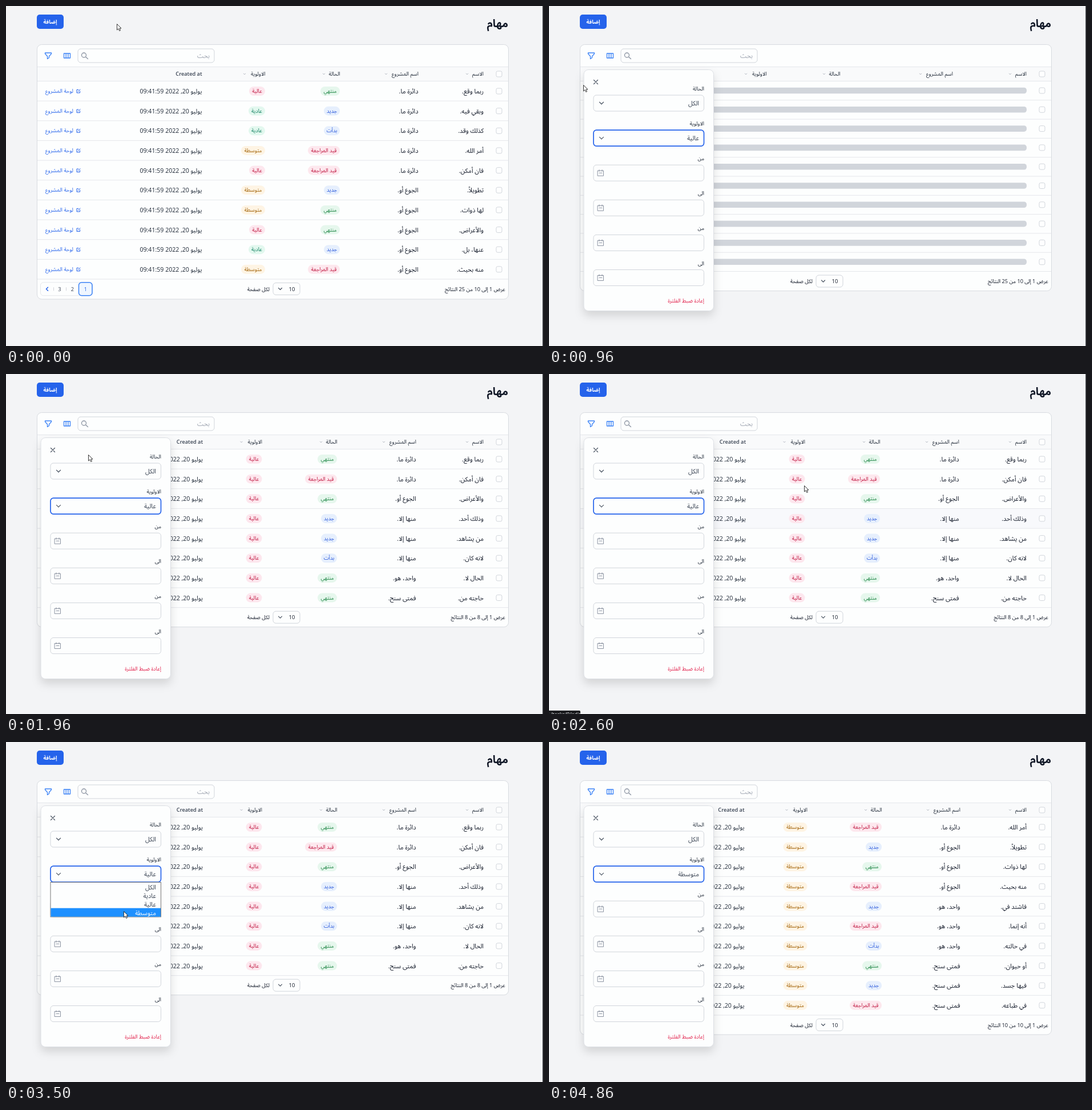
These frames come from a looping animation (941x595 px, 5.8 s). An HTML page:

```html
<!DOCTYPE html>
<html lang="ar">
<head>
<meta charset="utf-8">
<style>
html, body { margin: 0; width: 100%; height: 100%; overflow: hidden; background: #f3f4f6; }
svg { display: block; direction: rtl; font: 11px 'Open Sans', 'Noto Sans Arabic', 'DejaVu Sans', sans-serif; fill: #111827; }
.s { font-size: 9.2px; font-weight: 500; }
.b { font-weight: 600; }
.m { text-anchor: middle; }
.i { fill: none; stroke-linecap: round; stroke-linejoin: round; }
</style>
</head>
<body>
<svg id="stage" width="941" height="595" viewBox="0 0 941 595"></svg>
<script>
const LOOP = 5800;
const BLUE = '#2563eb', GREY = '#d1d5db', LINE = '#e5e7eb', PAPER = '#fdfefe';

const text = (x, y, s, cls = '', fill = '#111827') =>
  `<text x="${x}" y="${y}" class="${cls}" fill="${fill}">${s}</text>`;
const rect = (x, y, w, h, r = 0, fill = PAPER, stroke = 'none', extra = '') =>
  `<rect x="${x}" y="${y}" width="${w}" height="${h}" rx="${r}" fill="${fill}" stroke="${stroke}" ${extra}/>`;
const icon = (x, y, d, stroke, w = 1.2) =>
  `<path class="i" transform="translate(${x} ${y})" d="${d}" stroke="${stroke}" stroke-width="${w}"/>`;
const line = y => rect(55, y - .5, 825, 1, 0, LINE);
const check = y => rect(859, y - 5, 10, 10, 2.5, PAPER, GREY);
const chevron = (x, y, size, color, w) => icon(x, y, `M${-size} ${-size / 2}L0 ${size / 2}L${size} ${-size / 2}`, color, w);

// label: [pill width, text colour, background]
const PILLS = {
  'منتهي': [34, '#15803d', '#e6f7ed'],
  'جديد': [28, '#1d4ed8', '#e6effd'],
  'بدأت': [28, '#1d4ed8', '#e6effd'],
  'قيد المراجعة': [56, '#be123c', '#fde8ee'],
  'عالية': [28, '#be123c', '#fde7ee'],
  'عادية': [29, '#047857', '#e3f8ef'],
  'متوسطة': [42, '#a16207', '#fef4e4']
};
function pill(right, y, label) {
  const [w, color, back] = PILLS[label];
  return rect(right - w, y - 8, w, 16, 8, back) + text(right - w / 2, y + 3, label, 's m', color);
}

const HEADS = [['الاسم', 29], ['اسم المشروع', 57], ['الحالة', 28.5], ['الاولوية', 36.5]];
const EDIT = 'M0-2.5H-3V3H2.5V0M-1 1L3-3';

function dataRow(row, i, cols) {
  const y = 149 + i * 34.65, [name, project, status, priority] = row.split('|');
  return check(y) + text(837, y + 4, name) + text(cols[1] - .5, y + 4, project) +
    pill(cols[2] - .5, y, status) + pill(cols[3] - .5, y, priority) +
    text(cols[4], y + 4, 'يوليو 20, 2022 09:41:59', '', '#1f2937').replace('<text', '<text font-size="10.6"') +
    text(118, y + 3, 'لوحة المشروع', 's', BLUE) + icon(127, y, EDIT, BLUE, 1);
}

function pager(y) {
  let s = rect(60.5, y - 11.5, 91, 23, 5, PAPER, LINE) + rect(127.5, y - 11.5, 23.5, 23, 5, '#eff6ff', '#3b82f6', 'stroke-width="1.5"');
  [139.5, 116.5, 94].forEach((x, i) => s += text(x, y + 3.5, i + 1, 's m', i ? '#374151' : BLUE));
  return s + rect(105, y - 3, 1, 6, 0, GREY) + rect(83, y - 3, 1, 6, 0, GREY) + icon(72, y, 'M1.5-3L-1.5 0L1.5 3', BLUE, 1.5);
}

function table({ id, cols, rows, bones = 0, foot, pages }) {
  const n = bones || rows.length, pitch = bones ? 33.3 : 34.65;
  const end = 131.5 + n * pitch, mid = end + 17, bottom = end + (pages ? 35 : 34);
  let s = rect(54.5, 67.5, 826, bottom - 67.5, 8, PAPER, '#d8dbe0') + rect(55, 107, 825, 24, 0, '#f9fafb') + line(106.5) + line(131.5);
  s += `<rect class="hover" x="55" width="825" height="33.6" fill="#f8f9fc" visibility="hidden"/>`;
  s += check(119);
  HEADS.forEach(([label, gap], i) => s += text(cols[i], 122, label, 's', '#1f2937') + chevron(cols[i] - gap, 119, 1.7, '#9ca3af', .8));
  if (cols[4]) s += text(cols[4], 122, 'Created at', 's b', '#374151');
  for (let i = 0; i < n; i++) {
    if (bones) s += check(148 + i * pitch) + `<g class="bone">${rect(98, 142.7 + i * pitch, 739, 10.6, 4.5, GREY)}</g>`;
    else s += dataRow(rows[i], i, cols);
    s += line(131.5 + (i + 1) * pitch);
  }
  s += text(875, mid + 3.5, foot, 's') + text(462, mid + 3.5, 'لكل صفحة', 's') +
    rect(468, mid - 10.5, 47, 21, 5, PAPER, GREY) + text(501, mid + 3.5, 10, 'm').replace('<text', '<text font-size="9.5"') +
    chevron(480.5, mid, 3, '#4b5563', 1.2);
  if (pages) s += pager(mid + .3);
  return `<g id="${id}">${s}</g>`;
}

const ALL = ['ربما وقع.|دائرة ما.|منتهي|عالية', 'وبقي فيه.|دائرة ما.|جديد|عادية', 'كذلك وقد.|دائرة ما.|بدأت|عادية',
  'أمر الله.|دائرة ما.|قيد المراجعة|متوسطة', 'فان أمكن.|دائرة ما.|قيد المراجعة|عالية', 'تطويلاً.|الجوع أو.|جديد|متوسطة',
  'لها ذوات.|الجوع أو.|منتهي|متوسطة', 'والأعراض.|الجوع أو.|منتهي|عالية', 'عنها، بل.|الجوع أو.|جديد|عادية', 'منه بحيث.|الجوع أو.|قيد المراجعة|متوسطة'];
const HIGH = [ALL[0], ALL[4], ALL[7], 'وذلك أحد.|منها إلا.|جديد|عالية', 'من يشاهد.|منها إلا.|جديد|عالية',
  'لانه كان.|منها إلا.|بدأت|عالية', 'الحال لا.|واحد، هو.|منتهي|عالية', 'حاجته من.|فمتى سنح.|منتهي|عالية'];
const MEDIUM = [ALL[3], ALL[5], ALL[6], ALL[9], 'فاشتد في.|واحد، هو.|جديد|متوسطة', 'أنه إنما.|واحد، هو.|قيد المراجعة|متوسطة',
  'في حالته.|واحد، هو.|بدأت|متوسطة', 'أو حيوان.|فمتى سنح.|منتهي|متوسطة', 'فيها جسد.|فمتى سنح.|جديد|متوسطة', 'في طباعه.|فمتى سنح.|قيد المراجعة|متوسطة'];

const count = (shown, total) => `عرض 1 إلى ${shown} من ${total} النتائج`;
const BONE_COLS = [837, 708, 510.5, 381.5];
const tables = [
  { id: 'all', from: 0, cols: [837, 723, 585.5, 454.5, 343.5], rows: ALL, foot: count(10, 25), pages: true },
  { id: 'load1', from: 880, cols: BONE_COLS, bones: 10, foot: count(10, 25) },
  { id: 'high', from: 1800, cols: [837, 719, 580.5, 449, 345], rows: HIGH, foot: count(8, 8) },
  { id: 'load2', from: 3640, cols: BONE_COLS, bones: 8, foot: count(8, 8) },
  { id: 'medium', from: 4150, cols: [837, 721, 583.5, 453, 342.5], rows: MEDIUM, foot: count(10, 10) }
];

function chrome() {
  return text(880, 37, 'مهام', 'b').replace('<text', '<text font-size="18.5"') +
    rect(54, 15, 47, 25, 5, BLUE) + text(77.5, 31, 'إضافة', 's b m', '#fff') +
    icon(74, 87, 'M-5.5-5H5.5V-3.5L1.5 1V3.5L-1.5 5.5V1L-5.5-3.5Z', '#3b82f6', 1.3) +
    icon(107, 87, 'M-5.5-4H5.5V4H-5.5ZM-1.8-4V4M1.8-4V4', '#3b82f6', 1.3) +
    rect(126, 75, 239, 24, 5, PAPER, GREY) +
    icon(137, 86, 'M3.5 0A4 4 0 1 1-4.5 0A4 4 0 1 1 3.5 0M2.5 3L6.5 6.5', '#8b93a1', 1.3) +
    text(357, 91, 'بحث', '', '#9ca3af') + rect(940, 0, 1, 595, 0, '#55585e');
}

function panel() {
  let s = rect(61, 111.5, 227.5, 422, 8, PAPER, '#dcdfe4', 'style="filter:drop-shadow(0 8px 8px rgb(0 0 0/.13))"') +
    icon(82, 133, 'M-3.5-3.5L3.5 3.5M3.5-3.5L-3.5 3.5', '#4b5563', 1.2);
  ['الحالة', 'الاولوية', 'من', 'الى', 'من', 'الى'].forEach((label, i) => {
    const y = 170 + i * 61.1;
    s += text(272, y - 22, label, 's', '#1f2937') +
      rect(78, y - 14, 193.5, 28, 5, PAPER, GREY, i === 1 ? 'id="field"' : '');
    if (i < 2) s += chevron(92, y, 3.5, '#4b5563', 1.2);
    else s += icon(90.5, y, 'M-5-4H5V5H-5ZM-2.5-5.5V-3M2.5-5.5V-3M-2.5 0H2.5', '#8b93a1', 1);
  });
  return s + text(263, 174, 'الكل', '', '#374151') +
    `<text id="value" x="263" y="235" fill="#374151"></text>` + text(272, 518.5, 'إعادة ضبط الفلترة', 's', '#e11d48');
}

const OPTIONS = ['الكل', 'عادية', 'عالية', 'متوسطة'];
const popup = rect(78, 245.5, 193.5, 60.5, 0, PAPER, '#767676') +
  '<rect id="mark" x="78.5" width="192.5" height="15" fill="#1e90ff"/>' +
  OPTIONS.map((o, i) => `<text class="option" x="263" y="${258 + i * 14.9}">${o}</text>`).join('');

const $ = id => document.getElementById(id);
$('stage').innerHTML = tables.map(table).join('') + chrome() +
  `<g id="panel">${panel()}<g id="popup">${popup}</g></g>
  <g id="status" direction="ltr"><rect id="bubble" y="589" height="8" rx="2" x="-3" fill="#1b1c1f"/>
  <text id="link" x="3" y="599" font-size="9" fill="#e5e7eb">/tasks/9/edit</text></g>
  <path id="cursor" d="M.5.5V11L3 8.7L4.7 12.5L6.5 11.7L4.9 8H8Z" fill="#fff" stroke="#222" stroke-width=".9"/>`;

// time, x, y of the pointer tip
const PATH = [[0, 194, 31], [30, 194, 31], [60, 70, 82], [300, 70, 82], [430, 200, 226], [520, 200, 226], [640, 205, 280],
  [860, 205, 280], [950, 60, 138], [1000, 60, 138], [1400, 144, 141], [2200, 144, 141], [2350, 330, 100], [2500, 480, 252],
  [2600, 447, 195], [2760, 440, 182], [2800, 440, 182], [3000, 200, 231], [3090, 200, 231], [3200, 204, 287], [3400, 204, 287],
  [3470, 206, 296], [3600, 206, 296], [3930, 387, 438], [4300, 387, 438], [4800, 500, -20], [LOOP, 500, -20]];
const ease = p => p * p * (3 - 2 * p);
function pointer(t) {
  const i = Math.max(1, PATH.findIndex(p => p[0] > t));
  const [t0, x0, y0] = PATH[i - 1], [t1, x1, y1] = PATH[i];
  const k = ease(Math.max(0, t - t0) / (t1 - t0));
  return [x0 + (x1 - x0) * k, y0 + (y1 - y0) * k];
}
const within = (t, a, b) => t >= a && t < b;
const show = (el, on) => el.setAttribute('visibility', on ? 'inherit' : 'hidden');

function draw(t) {
  const now = tables.findLast(s => t >= s.from);
  tables.forEach(s => $(s.id).style.display = s === now ? '' : 'none');

  if (now.bones) {
    const p = Math.max(0, t - now.from - 20) / 1000;
    const fade = 1 - .5 * ease(1 - Math.abs(1 - p % 2));
    $(now.id).querySelectorAll('.bone').forEach(b => b.setAttribute('opacity', fade));
  } else {
    const [hx, hy] = pointer(Math.max(0, t - 100)), row = Math.floor((hy - 131.5) / 34.65);
    const hover = $(now.id).querySelector('.hover');
    show(hover, hx > 289 && row >= 0 && row < now.rows.length);
    hover.setAttribute('y', 132 + row * 34.65);
  }

  $('panel').setAttribute('opacity', Math.min(1, Math.max(0, (t - 230) / 100)));
  const focus = t >= 450;
  $('field').setAttribute('stroke', focus ? BLUE : GREY);
  $('field').setAttribute('stroke-width', focus ? 1.7 : 1);
  $('value').textContent = OPTIONS[t < 700 ? 0 : t < 3520 ? 2 : 3];

  const [x, y] = pointer(t);
  show($('popup'), within(t, 460, 700) || within(t, 3040, 3520));
  const pick = t < 700 ? (y < 261 ? 0 : y < 275 ? 1 : 2) : t < 3440 ? 2 : 3;
  $('mark').setAttribute('y', 246 + pick * 14.9);
  document.querySelectorAll('.option').forEach((o, i) => o.setAttribute('fill', i === pick ? '#fff' : '#374151'));

  const short = within(t, 2450, 2820);
  show($('status'), short || within(t, 4030, 4500));
  show($('link'), short);
  $('bubble').setAttribute('width', short ? 58 : 361);
  $('cursor').setAttribute('transform', `translate(${x} ${y})`);
}

const start = performance.now();
function tick() {
  draw((performance.now() - start) % LOOP);
  requestAnimationFrame(tick);
}
draw(0);
requestAnimationFrame(tick);
</script>
</body>
</html>
```
